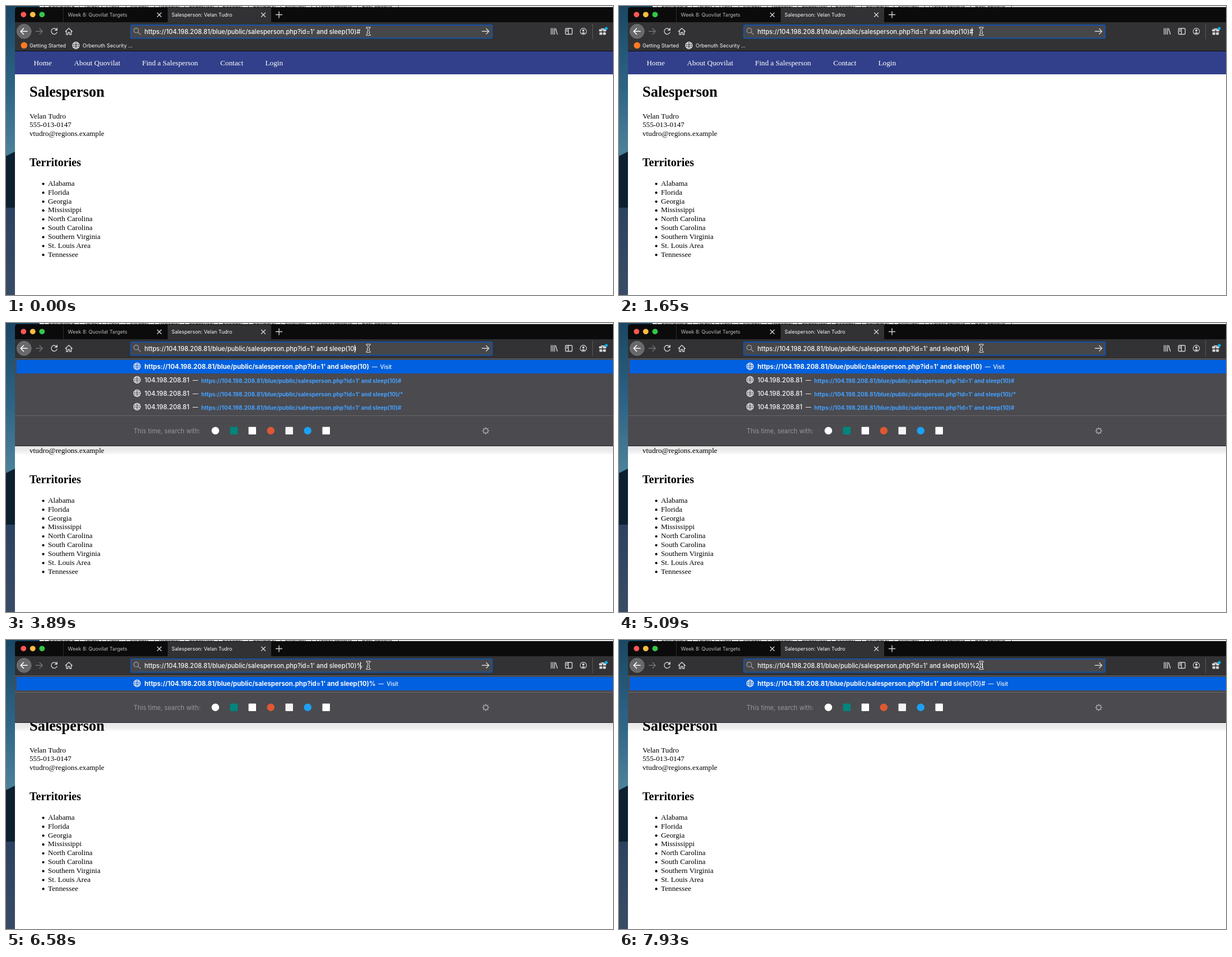
These frames come from a looping animation (1085x516 px, 8 s). An HTML page:

```html
<!DOCTYPE html>
<html lang="en">
<head>
<meta charset="utf-8">
<title>Salesperson</title>
<style>
  html, body { margin: 0; width: 100%; height: 100%; overflow: hidden; background: #fff; }
  svg { display: block; width: 1085px; height: 516px; }
  text { white-space: pre; }
  .ui { font-family: Inter, "Open Sans", sans-serif; fill: #f9f9fa; }
  .page { font: 13.23px "Liberation Serif", "Times New Roman", serif; fill: #000; }
  .nav { fill: #fff; }
  .h1 { font-size: 26.5px; font-weight: bold; }
  .h2 { font-size: 20.15px; font-weight: bold; }
  .small { font-size: 9.1px; }
  .bar { font-size: 11.13px; font-weight: 500; }
  .row { font-size: 11.4px; font-weight: 500; }
  .bold { font-weight: 700; }
  .link { font-size: 9.97px; font-weight: 700; fill: #45a1ff; }
  .hint { font-size: 9.9px; font-weight: 500; }
  .icon { fill: none; stroke: #d4d4d6; stroke-width: 1.4; stroke-linecap: round; stroke-linejoin: round; }
</style>
</head>
<body>
<svg viewBox="0 0 1085 516">
  <defs>
    <linearGradient id="desk" x1="0" y1="0" x2="0" y2="1">
      <stop offset="0" stop-color="#1a4764"/>
      <stop offset=".28" stop-color="#2d6485"/>
      <stop offset=".5" stop-color="#4a8099"/>
    </linearGradient>
    <linearGradient id="ground" x1="0" y1="0" x2="0" y2="1">
      <stop offset="0" stop-color="#2b4260"/>
      <stop offset="1" stop-color="#394c65"/>
    </linearGradient>
    <linearGradient id="shade" x1="0" y1="0" x2="0" y2="1">
      <stop offset="0" stop-color="#000" stop-opacity=".1"/>
      <stop offset=".55" stop-color="#000" stop-opacity=".07"/>
      <stop offset="1" stop-color="#000" stop-opacity=".03"/>
    </linearGradient>
    <g id="globe" class="icon" style="stroke:#e6e6e8;stroke-width:1.15">
      <circle r="6"/><ellipse rx="2.8" ry="6"/><path d="M-6 0H6M-5.2-3H5.2M-5.2 3H5.2"/>
    </g>
    <path id="close" d="M-3.5-3.5 3.5 3.5M3.5-3.5-3.5 3.5"/>
    <path id="beam" d="M645 38.7Q647.6 38.7 647.6 40.5Q647.6 38.7 650.2 38.7M647.6 40.5V49.7M645 51.5Q647.6 51.5 647.6 49.7Q647.6 51.5 650.2 51.5M646.2 46.8H649"/>
  </defs>

  <!-- desktop -->
  <rect width="60" height="516" fill="url(#desk)"/>
  <path d="M0 268 16 260V362H0Z" fill="#0c2030"/>
  <rect y="360" width="16" height="156" fill="url(#ground)"/>
  <rect x="60" width="1025" height="4" fill="#ececed"/>
  <g id="menu" class="ui" style="font-size:9px"></g>

  <!-- page -->
  <rect x="16" y="80" width="1069" height="436" fill="#fff"/>
  <rect x="16" y="81" width="1069" height="41" fill="#32408b"/>
  <g id="page" class="page"></g>

  <!-- window chrome -->
  <path d="M16 81V7Q16 2 21 2H1085V81Z" fill="#0b0b0c"/>
  <rect x="16" y="29" width="1069" height="51" fill="#323234"/>
  <rect x="289" y="3" width="185" height="27" fill="#323234"/>
  <path d="M102.5 4V29" stroke="#2c2c2e"/>
  <circle cx="31.3" cy="15.3" r="4.9" fill="#fc5753"/>
  <circle cx="47.8" cy="15.3" r="4.9" fill="#fdbc40"/>
  <circle cx="64.4" cy="15.3" r="4.9" fill="#33c748"/>
  <g class="ui" style="font-size:9px">
    <text x="110.5" y="19.3" style="fill:#bcbcbe">Week 8: Quovilat Targets</text>
    <text x="296" y="19.3">Salesperson: Velan Tudro</text>
  </g>
  <g class="icon">
    <use href="#close" x="274" y="15.7"/><use href="#close" x="460" y="15.7"/>
    <path d="M482.5 15.5H493.5M488 10V21"/>
    <circle cx="32.3" cy="45.3" r="12.8" fill="#69696c" stroke="#78787b" stroke-width="1"/>
    <path d="M38 45.3H26.5M31.5 40.1 26.3 45.3 31.5 50.5" stroke="#fff" stroke-width="1.6"/>
    <path d="M53.5 45.3H65M60 40.1 65.2 45.3 60 50.5" stroke="#737376"/>
    <path d="M90.3 42A5.2 5.2 0 1 0 91 47M91.3 39.5V43.3H87.5"/>
    <path d="M106.3 45.5 112.3 39.7 118.3 45.5M108 45V51H110.8V47.3H113.8V51H116.6V45"/>
    <path d="M974.5 40V50.5M977.5 40V50.5M980.5 40V50.5M982.5 40.5 985.5 50.3"/>
    <rect x="1000" y="40" width="12" height="10.5" rx="1.5"/><path d="M1005.3 40V50.5M1002 42.5H1003.5M1002 45H1003.5"/>
    <circle cx="1032" cy="45.3" r="5.7" stroke-width="1.1"/>
    <circle cx="1032" cy="43.7" r="2" fill="#d4d4d6" stroke="none"/>
    <path d="M1028.3 48.6Q1032 45.6 1035.7 48.6Q1032 51.5 1028.3 48.6Z" fill="#d4d4d6" stroke="none"/>
    <path d="M1048.5 32V59" stroke="#58585b" stroke-width="1"/>
    <path d="M1061 42H1065.3V45H1061ZM1068 42H1072.3V45H1068ZM1061.5 47.5H1065.3V51H1061.5ZM1068 47.5H1071.8V51H1068ZM1063.5 40 1066.6 42 1069.5 40" fill="#d4d4d6" stroke-width="1"/>
    <circle cx="1073" cy="40" r="2.6" fill="#00b3f4" stroke="none"/>
  </g>
  <circle cx="32.3" cy="70.3" r="5.8" fill="#ff7a22"/>
  <use href="#globe" x="125" y="70.3"/>
  <g class="ui small">
    <text x="42" y="73.8">Getting Started</text>
    <text x="137" y="73.8">Orbenuth Security ...</text>
  </g>

  <!-- suggestions -->
  <g id="panel">
    <rect id="sheet" x="16" y="62" width="1069" fill="#4a4a4f"/>
    <path d="M16 62.5H1085" stroke="#2a2a2c"/>
    <path d="M16 63.5H1085" stroke="#5c5c60"/>
    <rect x="19" y="66" width="1066" height="24" fill="#0060df"/>
    <use href="#globe" x="234.3" y="77.3"/>
    <text class="ui row" x="247.5" y="82.3"><tspan id="strong" class="bold"></tspan><tspan id="plain"></tspan><tspan dx="5" class="hint">—</tspan><tspan dx="5" class="hint">Visit</tspan></text>
    <g id="history"></g>
    <g id="footer">
      <path d="M16 165.5H1085" stroke="#68686c"/>
      <text class="ui" x="228" y="196.7" style="font-size:11.25px;fill:#98989b">This time, search with:</text>
      <g id="engines"></g>
      <g class="icon" transform="translate(857.5 192.5)" style="stroke:#b4b4b7">
        <circle r="3.9" stroke-width="1.2"/>
        <path id="teeth" stroke-width="1.5"/>
      </g>
      <rect x="16" y="220" width="1069" height="14" fill="url(#shade)"/>
      <path d="M16 219.5H1085" stroke="#222225"/>
    </g>
  </g>

  <!-- address field -->
  <rect x="223" y="34" width="646" height="23.5" rx="2" fill="#474749" stroke="#1552a8" stroke-width="2"/>
  <g class="icon">
    <circle cx="232.7" cy="43.7" r="4.2" style="stroke:#98989b"/><path d="M236 47 240.3 51" style="stroke:#98989b"/>
    <path d="M851 45.3H863M858.5 40.5 863.2 45.3 858.5 50.1"/>
  </g>
  <text id="address" class="ui bar" x="247.5" y="49.8"></text>
  <rect id="caret" width="1" fill="#fff"/>
  <g fill="none" stroke-linecap="round">
    <use href="#beam" stroke="#fff" stroke-width="3"/>
    <use href="#beam" stroke="#000" stroke-width="1.1"/>
  </g>
</svg>
<script>
const $ = id => document.getElementById(id);
const add = (parent, html) => $(parent).insertAdjacentHTML('beforeend', html);
const label = (parent, x, y, text, cls = '') =>
  add(parent, `<text x="${x}" y="${y}" class="${cls}">${text}</text>`);

const LOOP = 8000;
const HOST = '104.198.208.81';
const BASE = `https://${HOST}/blue/public/salesperson.php?id=1' and `;

// tool tabs peeking out above the window
[['Dashboard', 76], ['Target', 139], ['Proxy', 179], ['Intruder', 222], ['Repeater', 273],
 ['Sequencer', 327], ['Decoder', 387], ['Comparer', 441], ['Extender', 499],
 ['Project options', 554], ['User options', 636], ['', 709]].forEach(([name, x]) => {
  add('menu', `<text x="${x}" y="1.6" style="fill:#222">${name}</text>
    <path d="M${x - 7.5} 0V2" stroke="#555"/>`);
});

[['Home', 49.5], ['About Quovilat', 121.5], ['Find a Salesperson', 243.3], ['Contact', 383], ['Login', 463.5]]
  .forEach(([name, x]) => label('page', x, 106, name, 'nav'));
label('page', 42, 162, 'Salesperson', 'h1');
['Velan Tudro', '555-013-0147', 'vtudro@regions.example']
  .forEach((line, i) => label('page', 42, 200.5 + i * 15.9, line));
label('page', 42, 286, 'Territories', 'h2');
['Alabama', 'Florida', 'Georgia', 'Mississippi', 'North Carolina', 'South Carolina',
 'Southern Virginia', 'St. Louis Area', 'Tennessee'].forEach((state, i) => {
  const y = 320.8 + i * 15.85;
  label('page', 75, y, state);
  add('page', `<circle cx="66.6" cy="${y - 3.2}" r="2.1"/>`);
});

['#', '/*', '#'].forEach((end, i) => {
  const y = 106.3 + i * 24;
  add('history', `<use href="#globe" x="234.3" y="${y - 5}"/>`);
  label('history', 247.5, y, HOST, 'ui row');
  label('history', 333.5, y, '—', 'ui hint');
  label('history', 349, y + .2, `${BASE}sleep(10)${end}`, 'ui link');
});

[['#fff', 7], ['#00857c', 1], ['#fff', 1], ['#de5833', 7], ['#f4f4f4', 1], ['#1da1f2', 7], ['#fff', 1]]
  .forEach(([color, radius], i) => add('engines',
    `<rect x="${367.5 + i * 33}" y="185.5" width="13.5" height="13.5" rx="${radius}" fill="${color}"/>`));

$('teeth').setAttribute('d', Array.from({ length: 8 }, (_, i) => {
  const a = i * Math.PI / 4, c = Math.cos(a), s = Math.sin(a);
  return `M${4.6 * c} ${4.6 * s}L${5.7 * c} ${5.7 * s}`;
}).join(''));

// [time, typed ending, caret x (0 = hidden), history rows (-1 = closed)]
const STEPS = [
  [0, '#', 0, -1], [450, '#', 630.5, -1], [1050, '#', 0, -1], [1650, '#', 630.5, -1],
  [2250, '', 0, 3], [2850, '', 623, 3], [3290, '', 0, 3], [3890, '', 623, 3],
  [4490, '', 0, 3], [5090, '', 623, 3], [5690, '', 0, 3], [6130, '', 623, 3],
  [6430, '%', 633, 3], [6580, '%', 633, 0], [6730, '%', 0, 0],
  [7180, '%2', 640, 0], [7330, '%23', 646, 0], [7930, '%23', 0, 0]
];

function show([, ending, caretX, rows]) {
  const decoded = ending === '%23';
  $('address').textContent = `${BASE}sleep(10)${ending}`;
  $('strong').textContent = decoded ? BASE : `${BASE}sleep(10)${ending}`;
  $('plain').textContent = decoded ? 'sleep(10)#' : '';

  // the pointer hides all but the foot of the last caret
  const top = decoded ? 51 : 39;
  $('caret').setAttribute('x', caretX);
  $('caret').setAttribute('y', top);
  $('caret').setAttribute('height', caretX ? 53 - top : 0);

  const shift = rows ? 0 : -72;
  $('panel').style.display = rows < 0 ? 'none' : '';
  $('history').style.display = rows ? '' : 'none';
  $('sheet').setAttribute('height', 158 + shift);
  $('footer').setAttribute('transform', `translate(0 ${shift})`);
}

const start = performance.now();
let current;
function tick() {
  const t = (performance.now() - start) % LOOP;
  const step = STEPS.findLast(([time]) => time <= t);
  if (step !== current) show(current = step);
  requestAnimationFrame(tick);
}
tick();
</script>
</body>
</html>
```
